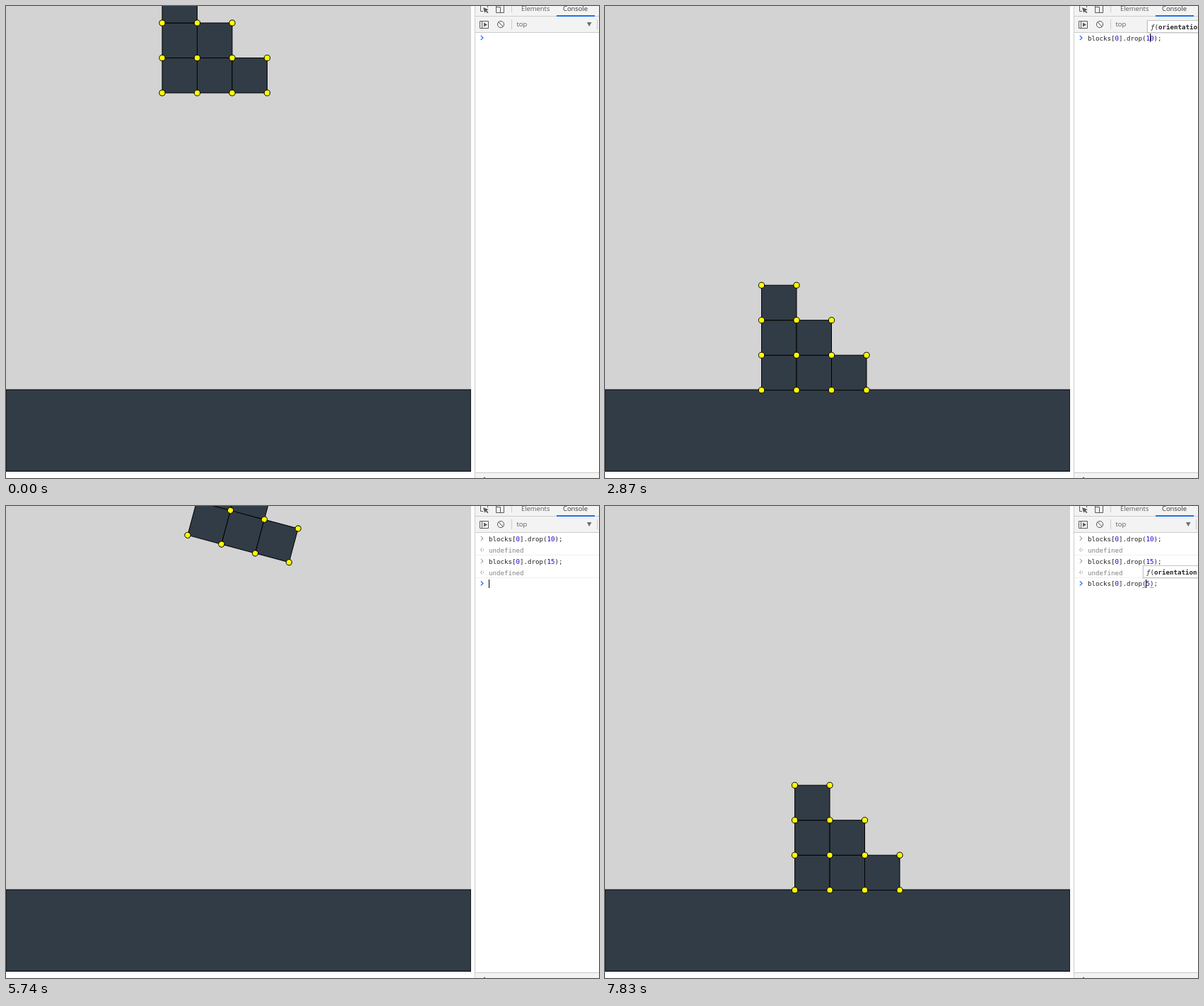
Recreate the animation shown at these times as an HTML page. Size 839 by 668 pixels, loop 8000 ms.

```html
<!DOCTYPE html>
<html lang="en">
<head>
<meta charset="utf-8">
<title>Falling blocks</title>
<style>
  html, body { margin: 0; width: 100%; height: 100%; overflow: hidden; background: #fff; }
  svg { display: block; width: 839px; height: 668px; }
  .ui { font: 9.4px "Open Sans", "Noto Sans", sans-serif; fill: #5a5a5a; }
  .mono { font: 9.13px "DejaVu Sans Mono", monospace; fill: #222; }
  .num { fill: #1c00cf; }
  .dim { fill: #808080; }
  .icon { fill: none; stroke: #5a5a5a; stroke-width: 1; }
  .rule { stroke: #ccc; }
  .dark { fill: #323c46; stroke: #000; }
  .dot { fill: #ff0; stroke: #000; }
</style>
</head>
<body>
<svg viewBox="0 0 839 668">
  <rect width="658" height="659" fill="#d3d3d3"/>
  <rect class="dark" y="543" width="658" height="115.5"/>
  <g id="block"></g>

  <rect x="658" width="181" height="668" fill="#fff"/>
  <rect x="663" width="176" height="37" fill="#f3f3f3"/>
  <rect x="663" y="661" width="176" height="7" fill="#f3f3f3"/>
  <path class="rule" d="M663.5 0V668M663 14.5H839M663 37.5H839M663 660.5H839M715.5 0V9M715.5 19V33M836.5 19V33"/>
  <rect x="779" y="13" width="54" height="2" fill="#1a73e8"/>
  <path class="icon" d="M671.5 0V7.5H675M681.5 0V2M693.5 0V9.5H704.5V0M693.5 1.5H699.5V9.5"/>
  <path d="M675 2L683 5L679.8 6.2L682.5 9L681.3 10.2L678.5 7.4L677.3 10Z" fill="#5a5a5a"/>
  <path class="icon" d="M670.5 21.5H682.5V31.5H670.5ZM673.5 21.5V31.5"/>
  <path d="M676 23.5L681 26.5L676 29.5Z" fill="#5a5a5a"/>
  <circle class="icon" cx="700" cy="26" r="4.6" stroke-width="1.4"/>
  <path class="icon" d="M696.8 22.8L703.2 29.2"/>
  <text class="ui" x="729" y="7">Elements</text>
  <text class="ui" x="788" y="7" style="fill:#333">Console</text>
  <text class="ui" x="722.5" y="29">top</text>
  <path d="M822 23H828.5L825.2 29Z" fill="#6e6e6e"/>
  <circle cx="677" cy="668" r="1.2" fill="#5a5a5a"/>
  <g id="history"></g>
  <g id="prompt"></g>
</svg>
<script>
const LOOP = 8000, STEP = 77.6, FALL = 0.0002645;
const CELL = 49.5, FLOOR = 543.7, CHAR = 5.5, LEFT = 683;
const $ = id => document.getElementById(id);
const rad = deg => deg * Math.PI / 180;
const mix = (a, b, u) => a + (b - a) * u;

// x, y: bottom left corner at rest; lift: tilt after the bounce; end: final x
const DROPS = [
  { from: 0, rest: -82, x: 221, y: 121.2, tilt: 0, lift: -0.8, end: 221.5 },
  { from: 3340, rest: 3335, x: 261.6, y: 38.5, tilt: 10, lift: 5.2, end: 268.5 },
  { from: 5660, rest: 5669, x: 257.1, y: 40, tilt: 15, lift: 9, end: 268.5 }
];

// R recalls the last call, E enters, < moves left, x is backspace, d is delete
const KEYS = [
  [1160, 'R'], [1710, '<<<<'], [2090, 'd'], [2870, '1'], [3340, 'E'],
  [4580, 'R'], [4737, '<<x'], [5370, '5'], [5660, 'E'],
  [6740, 'R'], [6890, '<<<<'], [7830, 'd']
];

function pose(now) {
  const d = DROPS.filter(d => d.from <= now).pop();
  const t = d.from + STEP * Math.floor((now - d.from + 20) / STEP);
  const drop = FLOOR - d.y - 3 * CELL * Math.sin(rad(d.tilt));
  const hit = d.rest + Math.sqrt(drop / FALL);
  const fall = s => [
    d.x - 0.0001 * d.tilt * (s - d.rest),
    d.y + FALL * (s - d.rest) ** 2,
    d.tilt
  ];
  if (t < hit) return fall(t);

  // Spin over the corner that struck, then rock back flat
  const spin = 9.5 * Math.abs(d.lift), rock = Math.sqrt(Math.abs(d.lift) / 3.6e-5);
  const settle = s => {
    const left = d.lift * (1 - Math.min(1, s / rock) ** 2);
    return [d.end + 1.4 * left, FLOOR - 3 * CELL * Math.sin(rad(Math.max(0, -left))), -left];
  };
  const after = t - hit - spin;
  if (after >= 0) return settle(after);
  const top = settle(0), u = 1 + after / spin;
  return fall(hit).map((v, i) => mix(v, top[i], u));
}

function typed(t) {
  const s = { line: '', col: t < 340 ? -1 : 0, hint: false, rows: [] };
  let memory = 'blocks[0].drop(90);';
  const splice = (from, to, add) => {
    s.line = s.line.slice(0, from) + add + s.line.slice(to);
    s.col = from + add.length;
  };
  for (const [at, keys] of KEYS) [...keys].forEach((key, i) => {
    const time = at + i * STEP;
    if (time > t) return;
    s.hint = /[xd\d]/.test(key);
    if (key === 'R') splice(0, 0, memory);
    else if (key === 'E') {
      memory = s.line;
      if (t >= time + STEP) s.rows.push(memory);
      s.line = '';
      s.col = 0;
    }
    else if (key === '<') s.col--;
    else if (key === 'x') splice(s.col - 1, s.col, '');
    else if (key === 'd') splice(s.col, s.col + 1, '');
    else splice(s.col, s.col, key);
  });
  return s;
}

function buildBlock() {
  let cells = '', dots = '';
  for (let r = 0; r <= 3; r++) {
    const width = r ? 4 - r : 3;
    for (let c = 0; c <= width; c++) {
      const x = c * CELL, y = -r * CELL;
      if (c < 3 - r) cells += `<rect class="dark" x="${x}" y="${y - CELL}" width="${CELL}" height="${CELL}"/>`;
      dots += `<circle class="dot" cx="${x}" cy="${y}" r="4.1"/>`;
    }
  }
  $('block').innerHTML = cells + dots;
}

const code = (line, y) => `<text class="mono" x="${LEFT}" y="${y + 3.6}">` +
  line.replace(/\d+/g, n => `<tspan class="num">${n}</tspan>`) + '</text>';
const chevron = (y, color, w) =>
  `<path d="M671.8 ${y - 3}L675 ${y}L671.8 ${y + 3}" fill="none" stroke="${color}" stroke-width="${w}"/>`;

function historyRow(line, i) {
  const y = 46 + 32 * i;
  return chevron(y, '#808080', 1) + code(line, y) +
    `<path d="M674 ${y + 13.5}L671.3 ${y + 16}L674 ${y + 18.5}" fill="none" stroke="#999"/>` +
    `<circle cx="675.5" cy="${y + 16}" r=".8" fill="#999"/>` +
    `<text class="mono dim" x="${LEFT}" y="${y + 19.6}">undefined</text>` +
    `<path d="M664 ${y + 23.5}H839" stroke="#f0f0f0"/>`;
}

function promptRow({ line, col, hint, rows }) {
  const y = 45 + 32.3 * rows.length, caret = Math.floor(LEFT + col * CHAR);
  const open = line.indexOf('('), close = line.indexOf(')');
  let out = chevron(y, '#367cf1', 1.4);
  if (line && [open + 1, close, close + 1].includes(col))
    for (const c of [open, close])
      out += `<rect x="${LEFT + c * CHAR}" y="${Math.round(y + 5)}" width="${CHAR}" height="1" fill="#999"/>`;
  out += code(line, y);
  if (col >= 0) out += `<rect x="${caret}" y="${Math.round(y - 6)}" width="1" height="12"/>`;
  if (hint) {
    const x = caret - 3.5, top = Math.floor(y) - 24.5;
    out += `<rect x="${x - 1}" y="${top}" width="90" height="18.5" opacity=".1"/>` +
      `<rect x="${x}" y="${top}" width="90" height="17" fill="#fff" stroke="#c4c4c4"/>` +
      `<text class="mono" x="${x + 4.5}" y="${top + 12}"><tspan font-style="italic">ƒ</tspan>(` +
      `<tspan font-weight="bold">orientation</tspan>)</text>`;
  }
  return out;
}

function put(id, html) {
  const el = $(id);
  if (el.shown !== html) el.innerHTML = el.shown = html;
}

const start = performance.now();
function draw() {
  const t = (performance.now() - start) % LOOP;
  const [x, y, deg] = pose(t);
  const state = typed(t);
  $('block').setAttribute('transform', `translate(${x} ${y}) rotate(${deg})`);
  put('history', state.rows.map(historyRow).join(''));
  put('prompt', promptRow(state));
  requestAnimationFrame(draw);
}
buildBlock();
draw();
</script>
</body>
</html>
```
